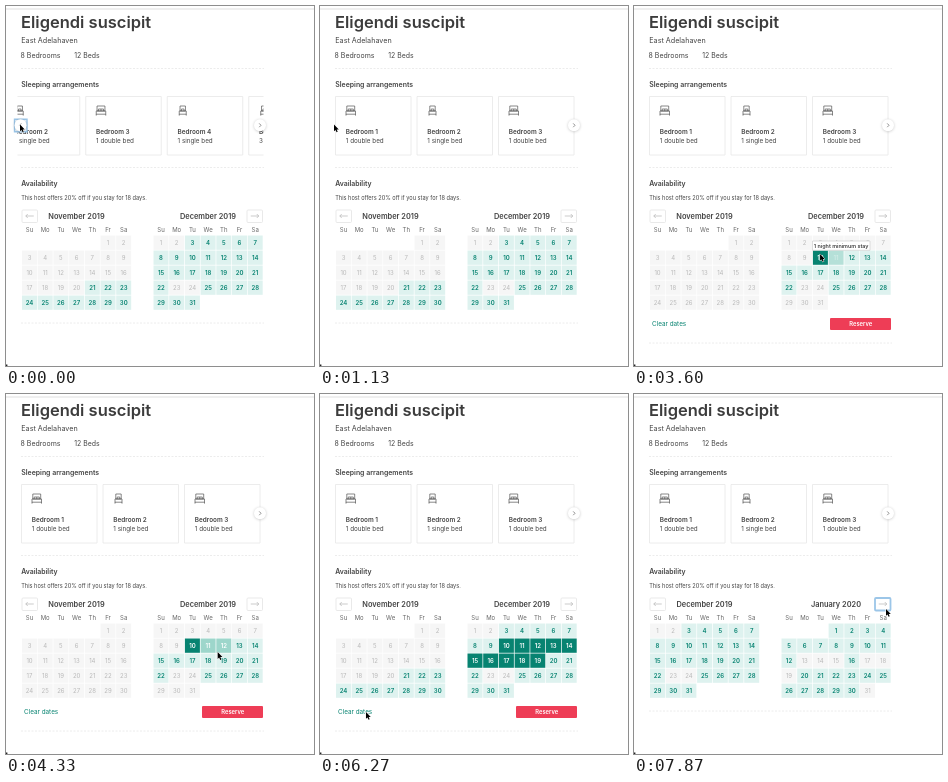
Write an HTML page with a canvas that moves like this. It is 308 px wide and 360 px high and loops after 8 s.

```html
<!DOCTYPE html>
<html lang="en">
<head>
<meta charset="utf-8">
<title>Room availability</title>
<style>
html, body { margin: 0; width: 100%; height: 100%; overflow: hidden; background: #fff; }
canvas { display: block; width: 308px; height: 360px; }
</style>
</head>
<body>
<canvas id="stage"></canvas>
<script>
const W = 308, H = 360, LOOP = 8000;
const canvas = document.getElementById('stage');
const ctx = canvas.getContext('2d');
const scale = window.devicePixelRatio || 1;
canvas.width = W * scale;
canvas.height = H * scale;

const INK = '#444', TEAL = '#078371', MINT = '#def2ef', PALE_MINT = '#b5e0d8', MID = '#9dd6cb';
const MUTED = '#b8b8b8', PALE = '#f6f6f6', LINE = '#e8e8e8', FOCUS = '#9cc6e8';

const CARD_STEP = 81.5, MONTH_STEP = 131.5, CELL = 15.7, ROW = 15;
const PICK = 3470, DONE = 4730, CLEAR = 6600, NEXT = 7330, NEXT_END = 7670;
const WEEK = ['Su', 'Mo', 'Tu', 'We', 'Th', 'Fr', 'Sa'];

const MONTHS = [
  { name: 'November 2019', first: 5, days: 30, free: d => d > 20 },
  { name: 'December 2019', first: 0, days: 31, free: d => d > 2 && d !== 23 && d !== 24 },
  { name: 'January 2020', first: 3, days: 31, free: d => d < 13 || d === 16 || (d > 19 && d < 31) }
];

const CARDS = ['1 double bed', '1 single bed', '1 double bed', '1 single bed', '3 single beds'];

// Pointer path: time, x, y
const PATH = [
  [0, 14, 118.5], [1400, 14, 118.5], [1730, 229, 173], [1940, 229, 173],
  [2000, 206, 222], [2070, 250, 256], [2130, 283, 242], [2660, 283, 242],
  [2730, 258.6, 239], [3000, 220, 243], [3330, 186, 248], [3600, 186, 248],
  [3870, 202, 249], [4070, 202, 249], [4530, 219, 265], [4870, 220, 265],
  [5000, 240, 312], [5350, 240, 312], [5400, 209, 272], [5660, 209, 272],
  [6100, 62, 320], [6270, 46, 318], [6530, 38, 317], [6800, 38, 317],
  [7270, 252, 215], [8000, 252, 215]
];

const clamp = v => Math.max(0, Math.min(1, v));
const progress = (t, from, to) => clamp((t - from) / (to - from));
const ease = p => p < 0.5 ? 4 * p ** 3 : 1 - 4 * (1 - p) ** 3;

function pointerAt(t) {
  const i = Math.max(1, PATH.findIndex(p => p[0] > t));
  const [t0, x0, y0] = PATH[i - 1], [t1, x1, y1] = PATH[i];
  const p = progress(t, t0, t1);
  return { x: x0 + (x1 - x0) * p, y: y0 + (y1 - y0) * p };
}

function text(str, x, y, size, color = INK, weight = 400, align = 'left') {
  ctx.font = `${weight} ${size}px Inter, sans-serif`;
  ctx.fillStyle = color;
  ctx.textAlign = align;
  ctx.fillText(str, x, y);
}

function rect(x, y, w, h, fill, stroke, width = 0.8, radius = 0) {
  ctx.beginPath();
  ctx.roundRect(x, y, w, h, radius);
  if (fill) { ctx.fillStyle = fill; ctx.fill(); }
  if (stroke) { ctx.strokeStyle = stroke; ctx.lineWidth = width; ctx.stroke(); }
}

function lines(color, width, ...paths) {
  ctx.beginPath();
  for (const path of paths) {
    path.forEach(([x, y], i) => i ? ctx.lineTo(x, y) : ctx.moveTo(x, y));
  }
  ctx.strokeStyle = color;
  ctx.lineWidth = width;
  ctx.stroke();
}

function clipped(x, y, w, h, draw) {
  ctx.save();
  ctx.beginPath();
  ctx.rect(x, y, w, h);
  ctx.clip();
  draw();
  ctx.restore();
}

function divider(y) {
  ctx.setLineDash([2, 1.5]);
  lines(LINE, 0.8, [[15, y], [258, y]]);
  ctx.setLineDash([]);
}

function bed(x, y, single) {
  const w = single ? 7 : 9.5;
  rect(x + 0.8, y, w - 1.6, 5, null, '#555', 0.7);
  rect(x, y + 5, w, 3.2, null, '#555', 0.7);
  lines('#555', 0.7,
    [[x + 2.2, y + 5], [x + 2.2, y + 3], [x + w - 2.2, y + 3], [x + w - 2.2, y + 5]],
    [[x, y + 8], [x, y + 9.6]], [[x + w, y + 8], [x + w, y + 9.6]]);
  if (!single) lines('#555', 0.7, [[x + w / 2, y + 3], [x + w / 2, y + 5]]);
}

function roundButton(x, dir) {
  ctx.save();
  ctx.shadowColor = 'rgba(0,0,0,.22)';
  ctx.shadowBlur = 3 * scale;
  ctx.shadowOffsetY = 0.5 * scale;
  ctx.beginPath();
  ctx.arc(x, 119.2, 6, 0, Math.PI * 2);
  ctx.fillStyle = '#fff';
  ctx.fill();
  ctx.restore();
  lines('#777', 0.8, [[x - dir * 0.8, 117.4], [x + dir, 119.3], [x - dir * 0.8, 121.2]]);
}

function drawCards(t) {
  const first = ease(progress(t, -330, 200)), second = ease(progress(t, 600, 1130));
  const shift = CARD_STEP * (first + second - 2);
  clipped(11.5, 86, 246, 68, () => CARDS.forEach((label, i) => {
    const x = 15.5 + i * CARD_STEP + shift;
    rect(x, 90.5, 75.5, 58.5, '#fff', LINE, 0.8);
    bed(x + (label.includes('single') ? 12 : 10.5), 100, label.includes('single'));
    text('Bedroom ' + (i + 1), x + 10.3, 127.7, 6.4, INK, 600);
    text(label, x + 10.3, 137.3, 6.3);
  }));
  if (t < 1100) {
    rect(8.5, 113.3, 12.5, 12.5, '#edf5fb', FOCUS, 1.4);
    roundButton(14.5, -1);
  }
  roundButton(254, 1);
}

function hoveredDay(t, pointer) {
  const col = Math.floor((pointer.x - 147.5) / CELL);
  const row = Math.floor((pointer.y - 229) / ROW);
  if (t > NEXT || col < 0 || col > 6 || row < 0 || row > 4) return 0;
  const day = row * 7 + col + 1;
  return day <= 31 ? day : 0;
}

function cellStyle(month, index, day, t, hover) {
  const december = index === 1;
  const picking = t >= PICK && t < DONE;
  if (december && t >= PICK && t < CLEAR) {
    if (day === 10 || (!picking && day > 10 && day < 20)) return [TEAL, '#fff', 600];
    if (picking && day > 10 && day <= hover) return [MID, '#fff', 600];
    if (picking && day === 11) return [PALE_MINT, '#d2ece7', 600];
  }
  const open = month.free(day) && (!picking || (december && day > 10 && day < 29));
  if (!open) return [PALE, MUTED, 400];
  return december && hover === day && t < PICK ? ['#bfe6df', TEAL, 600] : [MINT, TEAL, 600];
}

function drawMonth(index, x, t, hover) {
  const month = MONTHS[index];
  text(month.name, x + 54.5, 212.7, 7.4, INK, 600, 'center');
  for (let day = 1; day <= month.days; day++) {
    const slot = month.first + day - 1;
    const cx = x + (slot % 7) * CELL, cy = 229.5 + Math.floor(slot / 7) * ROW;
    const [fill, color, weight] = cellStyle(month, index, day, t, hover);
    rect(cx, cy, CELL - 0.7, ROW - 0.7, fill);
    text(day, cx + 7.5, cy + 9.2, 6, color, weight, 'center');
  }
}

function navButton(x, dir, focused) {
  rect(x, 204, 15.5, 12.5, '#fff', focused ? FOCUS : '#e4e4e4', focused ? 1.8 : 0.8, 1);
  const c = x + 7.75, tip = c + dir * 4;
  lines('#aaa', 0.6, [[c - dir * 4, 210], [tip, 210]],
    [[tip - dir * 2, 208], [tip, 210], [tip - dir * 2, 212]]);
}

function drawCalendar(t, pointer) {
  const hover = hoveredDay(t, pointer);
  const shift = MONTH_STEP * ease(progress(t, NEXT, NEXT_END));
  clipped(14, 202, 245, 112, () =>
    MONTHS.forEach((_, i) => drawMonth(i, 16 + i * MONTH_STEP - shift, t, hover)));
  for (const x of [23.5, 155]) {
    WEEK.forEach((name, i) => text(name, x + i * CELL, 225.8, 6, '#666', 400, 'center'));
  }
  navButton(16, -1, false);
  navButton(241, 1, t >= NEXT);

  const open = t >= PICK && t < CLEAR;
  divider(open ? 337 : 317);
  if (open) {
    text('Clear dates', 18, 320.4, 6.35, TEAL);
    rect(196, 312, 61, 12, '#ee3d56', null, 0, 1);
    text('Reserve', 226.7, 320.3, 5.8, '#fff', 600, 'center');
  }
  if (t >= PICK && t < DONE && hover === 10) {
    rect(178.5, 235, 57.5, 9.3, '#fff', '#cfcfcf', 0.7);
    text('1 night minimum stay', 207.2, 241.5, 5.4, INK, 600, 'center');
  }
}

function drawPointer({ x, y }) {
  const shape = [[0, 0], [0, 6.8], [1.5, 5.4], [2.6, 7.8], [3.7, 7.3], [2.7, 5], [4.8, 4.9]];
  ctx.beginPath();
  shape.forEach(([dx, dy]) => ctx.lineTo(x + dx, y + dy));
  ctx.closePath();
  ctx.lineJoin = 'round';
  ctx.strokeStyle = '#fff';
  ctx.lineWidth = 1;
  ctx.stroke();
  ctx.fillStyle = '#000';
  ctx.fill();
  ctx.lineJoin = 'miter';
}

function drawPage() {
  rect(0, 0, W, H, '#fff');
  rect(0, 2, W, 2, '#efefef');
  text('Eligendi suscipit', 15, 21.8, 16.5, '#3c3c3c', 600);
  text('East Adelahaven', 15.3, 36.5, 7.2);
  text('8 Bedrooms', 14.5, 52, 7);
  text('12 Beds', 68.3, 52, 6.9);
  divider(62.5);
  text('Sleeping arrangements', 15.2, 81, 6.95, INK, 600);
  divider(161.5);
  text('Availability', 15.2, 180, 6.9, INK, 600);
  text('This host offers 20% off if you stay for 18 days.', 15.2, 194.3, 5.64);
  rect(0, 358.6, 1.4, 1.4, '#222');
}

function frame(now) {
  const t = now % LOOP;
  const pointer = pointerAt(t);
  ctx.setTransform(scale, 0, 0, scale, 0, 0);
  drawPage();
  drawCards(t);
  drawCalendar(t, pointer);
  drawPointer(pointer);
}

const start = performance.now();
function tick() {
  frame(performance.now() - start);
  requestAnimationFrame(tick);
}
tick();
</script>
</body>
</html>
```
